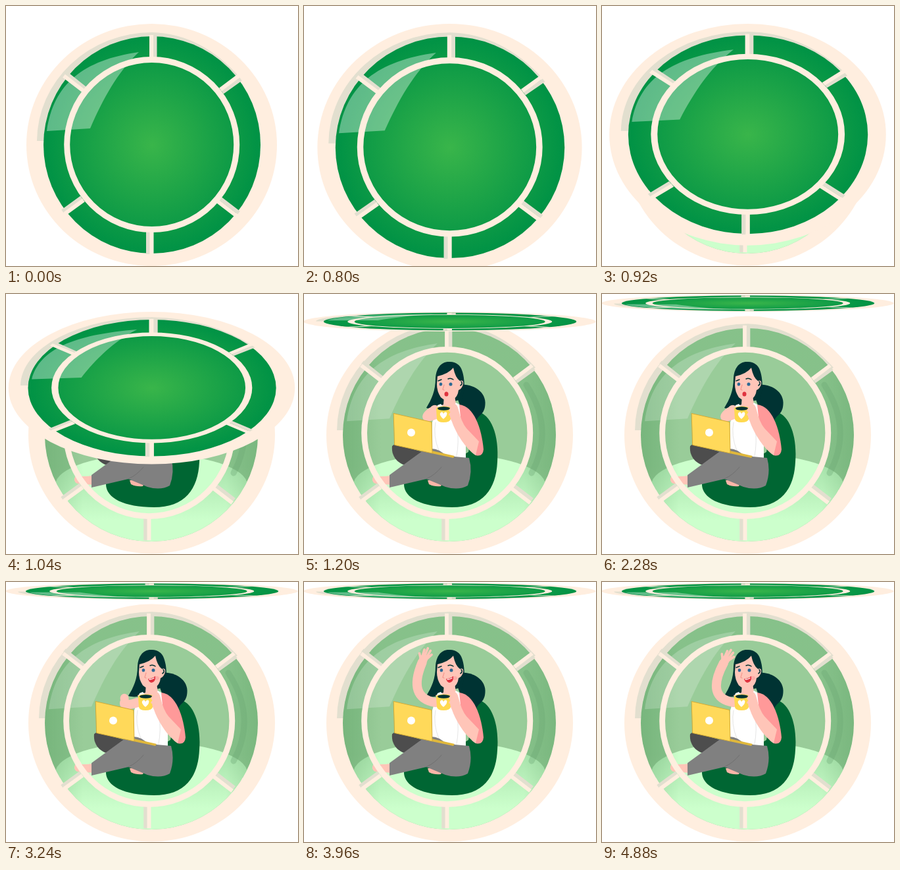
Write an HTML page that moves like this. It is 444 px wide and 395 px high and loops after 4.92 s.

```html
<!DOCTYPE html>
<html lang="en">
<head>
<meta charset="utf-8">
<title>Capsule</title>
<style>
html, body { margin: 0; width: 100%; height: 100%; overflow: hidden; background: #fff; }
svg { display: block; width: 444px; height: 395px; }
</style>
</head>
<body>
<svg viewBox="0 0 444 395" fill="none" stroke-linecap="round" stroke-linejoin="round">
  <defs>
    <radialGradient id="green" gradientUnits="userSpaceOnUse" cx="222" cy="211" r="165">
      <stop stop-color="#39b54a"/><stop offset="1" stop-color="#009245"/>
    </radialGradient>
    <linearGradient id="tint" x2="0" y2="1">
      <stop offset=".65" stop-color="#5faa6a" stop-opacity=".32"/>
      <stop offset=".9" stop-color="#5faa6a" stop-opacity="0"/>
    </linearGradient>
    <linearGradient id="edge">
      <stop stop-color="#5c9c62" stop-opacity=".35"/><stop offset=".18" stop-color="#5c9c62" stop-opacity="0"/>
      <stop offset=".85" stop-color="#5c9c62" stop-opacity="0"/><stop offset="1" stop-color="#5c9c62" stop-opacity=".3"/>
    </linearGradient>
    <clipPath id="inside"><ellipse cx="221" cy="214" rx="162" ry="162"/></clipPath>
    <path id="shade" fill="#e2dfcf" d="M47 205A175 166 0 0 1 222 40Q297 42 355 108L222 211L57 205Z"/>
    <path id="gloss" fill="#fff" d="M62 190C72 118 118 82 202 70C170 100 148 140 128 186Z"/>
    <g id="bars" stroke-linecap="butt">
      <path stroke="#e2dfcf" stroke-width="6" d="M226.500 44V79M216 342V377M329 131L357 111M90 101L120 125M86 312L115 291M324 291L354 314"/>
      <path stroke="#ffeedf" stroke-width="6" d="M221 44V79M221.500 342V377M326 127L354 106M88 106L118 129M89 316L118 295M321 296L351 319"/>
      <circle cx="221.700" cy="210.500" r="129" stroke="#ffeedf" stroke-width="9"/>
    </g>
  </defs>

  <!-- capsule interior -->
  <ellipse cx="221.500" cy="214" rx="187.500" ry="180.500" fill="#ffeedf"/>
  <use href="#shade" transform="translate(4 6) scale(.98)"/>
  <g clip-path="url(#inside)">
    <path fill="#9c9" d="M50 40H390V390H50Z"/>
    <path fill="#cfc" d="M75 290A146 47 0 0 1 367 290V380H75Z"/>
    <circle cx="221" cy="214" r="162" fill="url(#edge)"/>
    <path fill="url(#tint)" fill-rule="evenodd" d="M59 52H383V376H59ZM91 210.500A126.500 126.500 0 0 0 344 210.500A126.500 126.500 0 0 0 91 210.500Z"/>
    <path stroke="#6ca574" stroke-opacity=".35" stroke-width="9" d="M338 138Q382 205 346 272"/>
  </g>
  <use href="#gloss" transform="translate(4 6) scale(.985)" opacity=".2"/>

  <!-- chair and woman -->
  <path fill="#063" d="M262 178C285 182 297 215 294 255C292 297 272 324 225 324C180 324 152 310 152 289C152 275 170 280 200 270L250 240Z"/>
  <path fill="#033" d="M232 138C258 134 280 150 275 172C272 186 262 184 262 196C252 184 240 182 234 160Z"/>
  <path fill="#033" d="M222 103C208 102 201 113 200 128C200 147 194 160 186 173C198 177 210 172 216 166L240 160C247 145 244 113 234 107Q229 103 222 103Z"/>
  <path fill="#ffc5b8" d="M213 154H229L231 167L240 172L236 184H204L200 172L212 168Z"/>
  <path fill="#fff" d="M203 169L208 167Q220 184 231 165L236 168Q245 186 246 205V250L192 246L195 195Z"/>
  <path stroke="#ddd" stroke-width=".8" d="M200 195Q196 215 205 238M233 205Q236 225 232 246"/>
  <path fill="#f99" d="M236 168C258 170 270 203 273 236Q272 248 261 245L242 225Z"/>
  <path fill="#ffc5b8" d="M203 125Q220 121 227 112Q230 127 237 132Q243 130 242 137Q240 144 235 146Q234 156 226 161Q217 165 208 157Q202 148 202 137Z"/>
  <path stroke="#033" stroke-width="1.600" d="M239 133Q242 136 238 139"/>
  <g id="eyes" fill="#2d6a95"><ellipse cx="208" cy="137" rx="2.300" ry="2.600"/><ellipse cx="223" cy="137" rx="2.500" ry="2.600"/></g>
  <path id="brows" stroke="#033" stroke-width="1.400" d="M204 132L209 130M219 129Q223 127 227 130"/>
  <path stroke="#f59a90" stroke-width="1.300" d="M213 138L211 145L213 146"/>
  <ellipse id="blow" cx="216.500" cy="152" rx="3" ry="3.500" fill="#e0333f"/>
  <g id="smile">
    <path fill="#f99" fill-opacity=".6" d="M225 146a4 3 0 1 0 8 0a4 3 0 1 0-8 0"/>
    <path fill="#e0333f" d="M216 147Q222 147 227 143Q228 152 221 153Q217 152 216 147Z"/>
    <path stroke="#fff" stroke-width="1.300" d="M218 148Q222 148 225 146"/>
  </g>

  <g id="limb" stroke="#ffc5b8">
    <path id="arm" stroke-width="14"/>
    <g id="hand">
      <ellipse cy="-5" rx="6.500" ry="7.500" fill="#ffc5b8" stroke="none"/>
      <path id="fingers" stroke-width="3.600" d="M-3-7L-4-19M0-7L0-23M3-7L5-21M4-6L9-16M-4-4L-9-11"/>
    </g>
  </g>

  <path stroke="#e5bc3c" stroke-width="2.500" d="M223 178Q229 180 223 187"/>
  <path fill="#ffd94f" d="M201 174Q212 179 224 174L223 190Q222 195 212 195Q203 195 202 190Z"/>
  <ellipse cx="212.500" cy="174" rx="11.500" ry="3.600" fill="#ffd94f"/>
  <ellipse cx="212.500" cy="174" rx="9.500" ry="2.700" fill="#033"/>
  <path fill="#fff" d="M212 190Q204 183 208 180Q211 178 212 182Q214 178 217 180Q219 184 212 190Z"/>
  <path fill="#ffc5b8" d="M261 245C247 236 231 212 225 194Q220 186 223 176L227 167Q233 166 235 176Q239 194 247 204L266 224Z"/>
  <path id="tips" stroke="#ffc5b8" stroke-width="3.500" d="M222 177L228 168M222 183L230 176"/>

  <path fill="#4d4d4d" d="M134 231C132 250 147 262 166 262L195 244L138 228Z"/>
  <path fill="#fbb5a8" d="M188 283H212L208 292Q198 293 190 289Z"/>
  <path fill="#ffc5b8" d="M132 276Q117 278 106 276Q101 284 108 288L133 290Z"/>
  <path fill="#808080" d="M130 275L178 240Q192 231 206 238L218 246L251 249Q257 270 249 291Q235 299 215 293L186 281L130 294Z"/>
  <path stroke="#707070" d="M186 281Q199 275 209 263"/>
  <path fill="#e0b83b" d="M194 238L229 246L227 249L194 242Z"/>
  <path fill="#ffd95a" stroke="#d3aa35" d="M136.500 181.500L194 194.500L195 242L138 229.500Z"/>
  <circle cx="163" cy="210.500" r="6" fill="#fff"/>
  <use href="#bars" transform="translate(1 4.500) scale(.9775 .981)"/>

  <g id="lid">
    <ellipse cx="221.500" cy="211" rx="190.500" ry="184" fill="#ffeedf"/>
    <use href="#shade"/>
    <circle cx="222" cy="211" r="165" fill="url(#green)"/>
    <use href="#gloss" opacity=".36"/>
    <use href="#bars"/>
  </g>
</svg>
<script>
const LOOP = 4920, STEP = 40;
const $ = id => document.getElementById(id);
const set = (id, name, value) => $(id).setAttribute(name, value);
const progress = (t, from, to) => Math.min(1, Math.max(0, (t - from) / (to - from)));
const smooth = u => u * u * (3 - 2 * u);
const rad = deg => deg * Math.PI / 180;

// Each key: time, wrist x, wrist y, elbow x, elbow y, hand angle
const armKeys = [
  [2860, 194, 179, 178, 192, 50],
  [3400, 177, 183, 176, 190, -20],
  [3640, 146, 150, 170, 180, -42],
  [3960, 179.7, 122, 157, 176, 22]
];

function armPose(t) {
  if (t >= 3960) {
    const tilt = 12 + 17 * Math.sin(2 * Math.PI * (t - 3960) / 860);
    return [171 + 42 * Math.sin(rad(tilt)), 163 - 42 * Math.cos(rad(tilt)), 157, 176, tilt + 10];
  }
  const i = t < 3400 ? 0 : t < 3640 ? 1 : 2;
  const [a, b] = [armKeys[i], armKeys[i + 1]];
  const u = smooth(progress(t, a[0], b[0]));
  return a.slice(1).map((v, n) => v + (b[n + 1] - v) * u);
}

// The lid turns about its top edge and passes slightly beyond edge-on.
function drawLid(t) {
  const u = t < 640 ? 0 : progress(t, 600, 1200);
  const angle = rad(86 * (0.42 * smooth(u) + 0.58 * u * u));
  const rx = 190.5 + 31.5 * Math.sin(angle) ** 0.8;
  const past = 1 - (1 - progress(t, 1200, 1360)) ** 2;
  const ry = 0.966 * rx * Math.cos(angle) - 28 * past;
  set('lid', 'transform', `translate(221.5 27) scale(${rx / 190.5} ${ry / 184}) translate(-221.5 -27)`);
}

function drawWoman(t) {
  const sway = t > 1200 && t < 2840 ? Math.sin(2 * Math.PI * (t - 1200) / 540) : 0;
  const [x, y, ex, ey, turn] = armPose(t);
  set('arm', 'd', `M200 183Q${ex} ${ey} ${x} ${y}`);
  set('hand', 'transform', `translate(${x} ${y}) rotate(${turn})`);
  set('fingers', 'opacity', +(t > 3300));
  set('limb', 'transform', `translate(0 ${sway * 0.6})`);
  set('tips', 'transform', `translate(0 ${sway * 0.8})`);

  const happy = smooth(progress(t, 2600, 2840));
  const size = 1 + 0.1 * sway;
  set('blow', 'transform', `translate(216.5 152) scale(${size}) translate(-216.5 -152)`);
  set('blow', 'opacity', +(happy < 0.5));
  set('smile', 'opacity', +(happy >= 0.5));
  set('brows', 'transform', `translate(0 ${-2 * happy})`);
  set('eyes', 'transform', `translate(${happy} ${-3 * happy})`);
}

function frame(now) {
  const t = Math.floor((now % LOOP) / STEP) * STEP;
  drawLid(t);
  drawWoman(t);
  requestAnimationFrame(frame);
}
frame(performance.now());
</script>
</body>
</html>
```
